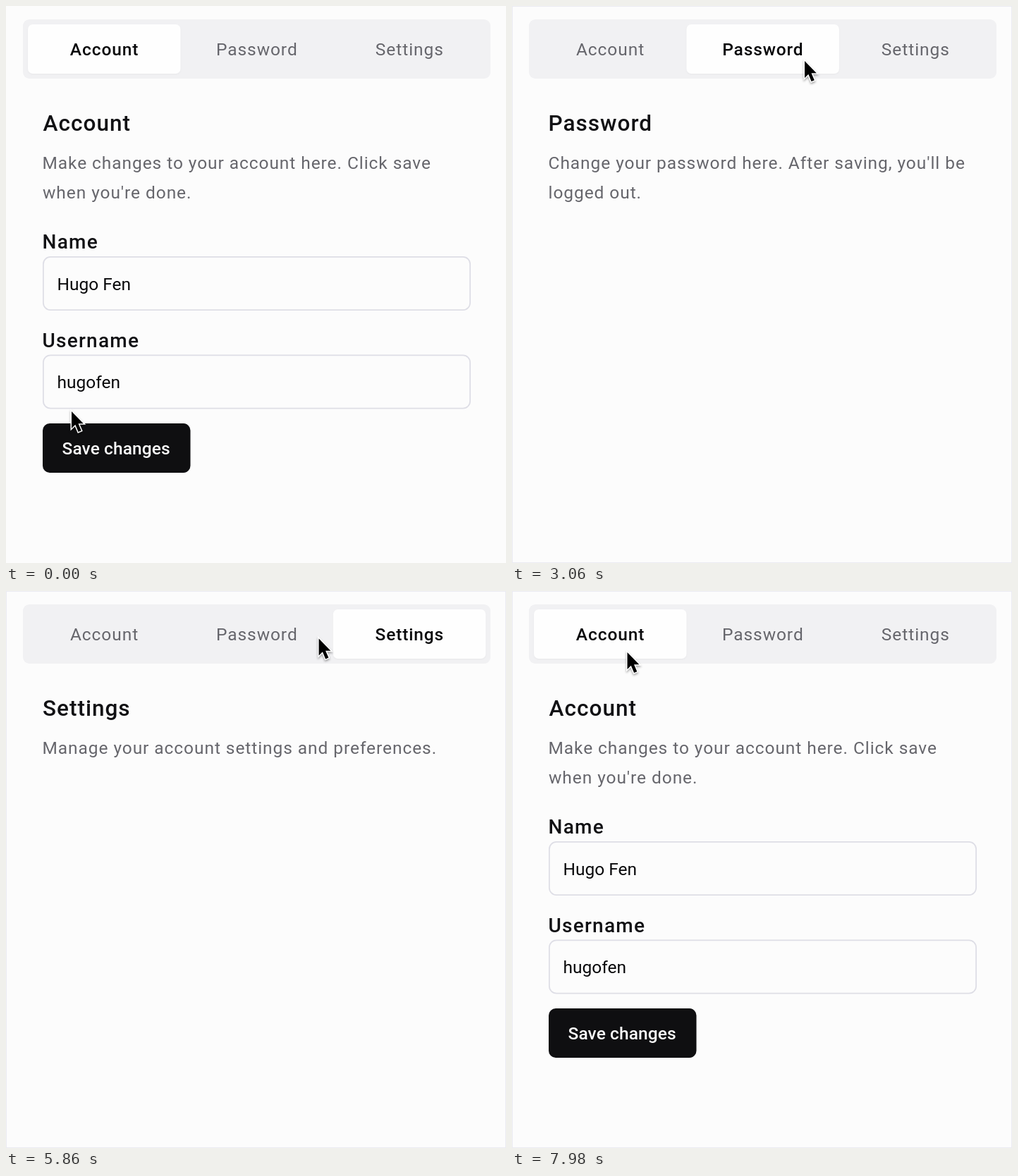
Write an HTML page that moves like this. It is 709 by 790 pixels and loops after 8000 ms.

```html
<!DOCTYPE html>
<html lang="en">
<head>
<meta charset="utf-8">
<title>Account tabs</title>
<style>
  html, body { margin: 0; width: 100%; height: 100%; overflow: hidden; background: #fcfcfc; }
  svg { display: block; width: 100vw; height: 100vh; }
  text { font: 400 24.5px Roboto, sans-serif; fill: #09090b; }
  .tab, .note { fill: #66666c; letter-spacing: .93px; }
  .tab { text-anchor: middle; }
  .tab.active { fill: #09090b; font-weight: 500; letter-spacing: .85px; }
  .title { font-size: 31.5px; font-weight: 500; letter-spacing: 1px; fill: #111114; }
  .label { font-size: 28px; font-weight: 500; letter-spacing: 1.25px; fill: #111114; }
  .button { fill: #fafafa; font-weight: 500; letter-spacing: .1px; }
  .field { fill: none; stroke: #dedee6; stroke-width: 1.75; }
  #pill { fill: #fefefe; filter: drop-shadow(0 1px 1px #0000000a); }
  #cursor { filter: drop-shadow(0 2px 1.5px #0005); }
</style>
</head>
<body>
<svg viewBox="0 0 709 790">
  <rect id="frame" x=".5" y=".5" width="708" height="789" fill="none" stroke="#ebebf2"/>
  <rect x="24" y="19" width="663" height="84" rx="9" fill="#f1f1f3"/>
  <rect id="pill" y="26" width="216.5" height="70" rx="7"/>
  <text class="tab" x="139.5" y="70">Account</text>
  <text class="tab" x="355.8" y="70">Password</text>
  <text class="tab" x="572.3" y="70">Settings</text>

  <g class="panel">
    <text class="title" x="52.5" y="177">Account</text>
    <text class="note" x="51.5" y="230.5">Make changes to your account here. Click save</text>
    <text class="note" x="52" y="272.5">when you're done.</text>
    <text class="label" x="51.5" y="343.5">Name</text>
    <rect class="field" x="52.9" y="355.9" width="605.2" height="75.2" rx="10"/>
    <text x="72.5" y="402.5">Hugo Fen</text>
    <text class="label" x="51.5" y="483.5">Username</text>
    <rect class="field" x="52.9" y="495.4" width="605.2" height="75.2" rx="10"/>
    <text x="72.5" y="542">hugofen</text>
    <rect x="52" y="592" width="209.5" height="70" rx="10" fill="#0f0f11"/>
    <text class="button" x="79.5" y="635.5">Save changes</text>
  </g>
  <g class="panel">
    <text class="title" x="51.5" y="177">Password</text>
    <text class="note" x="51.5" y="230.5">Change your password here. After saving, you'll be</text>
    <text class="note" x="51.5" y="272.5">logged out.</text>
  </g>
  <g class="panel">
    <text class="title" x="52" y="177">Settings</text>
    <text class="note" x="51.5" y="230.5">Manage your account settings and preferences.</text>
  </g>

  <path id="cursor" d="M0 0V24L5.3 18.8L9.6 29L13.8 27.2L9.5 17.3H16.8Z"
        stroke="#fff" stroke-width="3" paint-order="stroke"/>
</svg>
<script>
  const LOOP = 8000;
  const SWITCHES = [[0, 0], [2100, 1], [4850, 2], [7650, 0]]; // [time, tab]
  const MOVES = [ // pointer moves: [start, end, x, y]
    [0, 0, 93, 575],
    [80, 950, 397, 87],
    [1150, 1500, 415, 78],
    [3200, 3950, 577.5, 58],
    [5500, 6450, 163.5, 87],
  ];

  const pill = document.getElementById('pill');
  const frame = document.getElementById('frame');
  const cursor = document.getElementById('cursor');
  const tabs = document.querySelectorAll('.tab');
  const panels = document.querySelectorAll('.panel');

  const ease = p => p * p * (3 - 2 * p);

  function pointerAt(t) {
    let [, , x, y] = MOVES[0];
    for (const [start, end, toX, toY] of MOVES.slice(1)) {
      const p = ease(Math.min(1, Math.max(0, (t - start) / (end - start))));
      x += (toX - x) * p;
      y += (toY - y) * p;
    }
    return [x, y];
  }

  function draw(t) {
    const active = SWITCHES.findLast(([time]) => t >= time)[1];
    tabs.forEach((tab, i) => tab.classList.toggle('active', i === active));
    panels.forEach((panel, i) => panel.style.display = i === active ? '' : 'none');
    pill.setAttribute('x', 31 + active * 216.4);
    frame.style.display = t >= SWITCHES[1][0] ? '' : 'none';
    cursor.setAttribute('transform', `translate(${pointerAt(t)})`);
  }

  const origin = performance.now();
  function tick() {
    draw((performance.now() - origin) % LOOP);
    requestAnimationFrame(tick);
  }
  tick();
</script>
</body>
</html>
```
